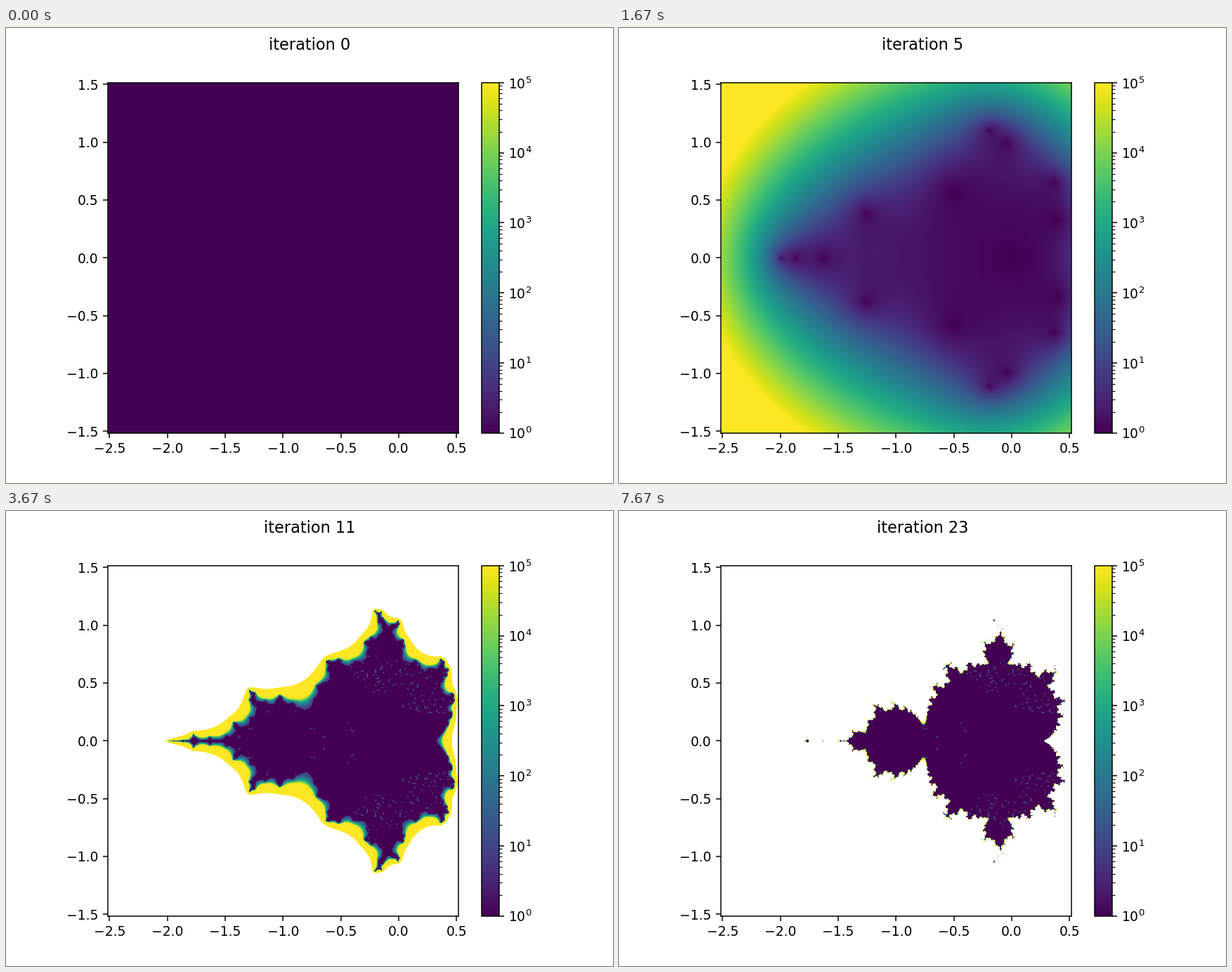
Animation of 864x648 px, one loop 8000 ms. Source, as a matplotlib script:

```python
import numpy as np
import matplotlib.pyplot as plt
from matplotlib.animation import FuncAnimation
from matplotlib.colors import LogNorm

FRAMES = 24
LOOP_MS = 8000
GRID = 500
CEILING = 1e9


def single_precision_steps(values):
    """Clip large values and round to the steps a float32 image can hold."""
    finite = values[np.isfinite(values)]
    span = min(float(finite.max()), CEILING) - 1
    if span <= 0:
        return values
    step = span * 2.0**-27 / 0.8
    clipped = np.where(np.isfinite(values), np.minimum(values, CEILING), np.nan)
    return (1 + np.round((clipped - 1) / step) * step).astype(np.float32)


def magnitudes(count):
    """Return 1 + |z| for each step of z -> z**2 + c, starting from zero."""
    x = np.linspace(-2.5, 0.5, GRID, dtype=np.float32)
    y = np.linspace(-1.5, 1.5, GRID, dtype=np.float32)
    cx, cy = np.meshgrid(x, y)
    re, im = np.zeros_like(cx), np.zeros_like(cy)
    result = []
    with np.errstate(all="ignore"):
        for _ in range(count):
            # Overflow of the squared modulus leaves escaped points blank.
            size = 1 + np.sqrt(re * re + im * im)
            result.append(np.ma.masked_invalid(single_precision_steps(size)))
            re, im = re * re - im * im + cx, 2 * re * im + cy
    return result


steps = magnitudes(FRAMES)

fig, ax = plt.subplots(figsize=(6.4, 4.8), dpi=135)
image = ax.imshow(
    steps[0],
    cmap="viridis",
    norm=LogNorm(1, 1e5, clip=True),
    origin="lower",
    extent=(-2.515, 0.515, -1.515, 1.515),
)
fig.colorbar(image)
title = fig.suptitle("iteration 0")


def update(i):
    image.set_data(steps[i])
    title.set_text(f"iteration {i}")
    return image, title


anim = FuncAnimation(
    fig, update, frames=FRAMES, interval=LOOP_MS / FRAMES, repeat=True, repeat_delay=0
)
plt.show()
```
